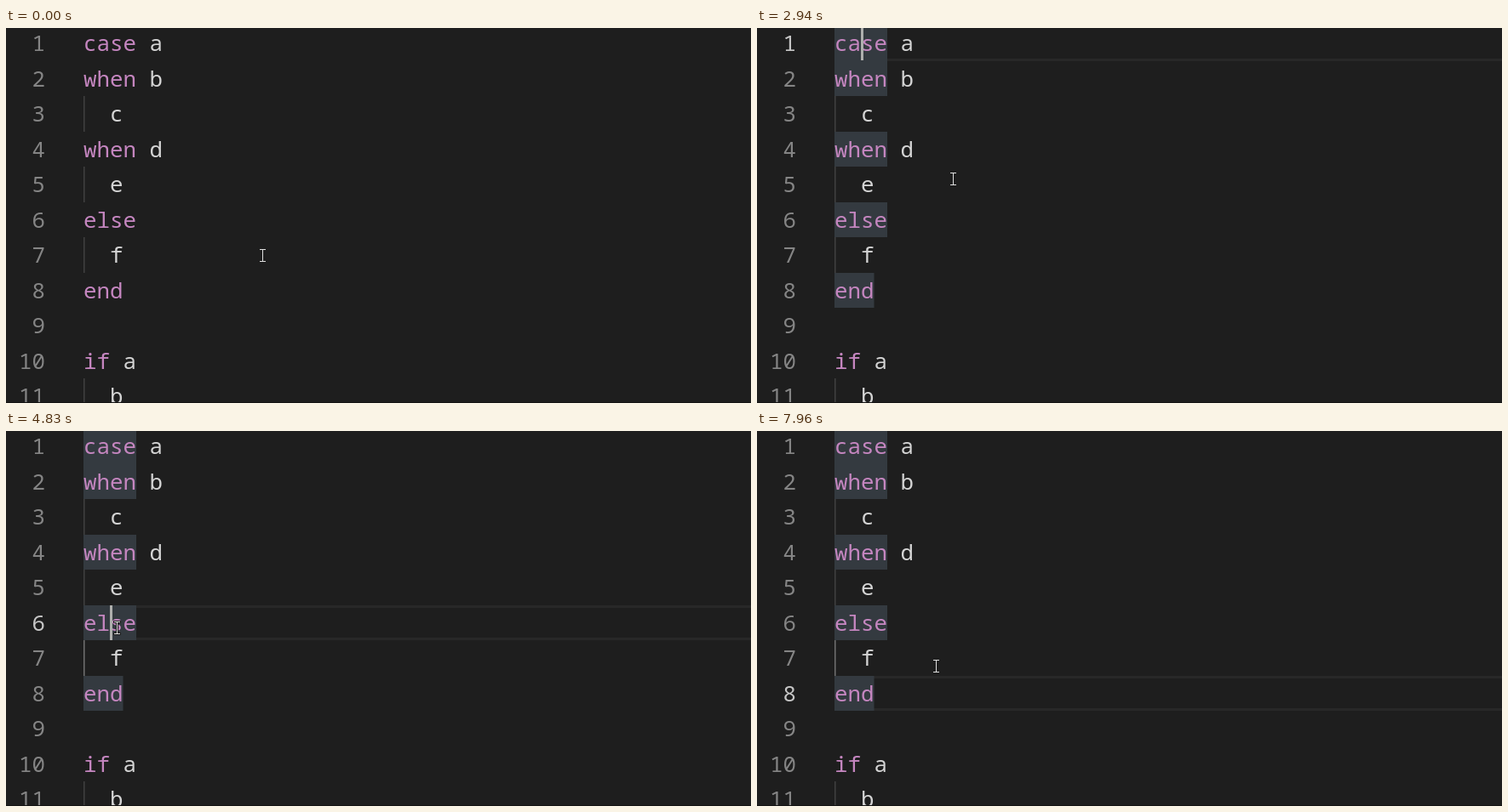
Animation of 875x441 px, one loop 8 s. Source, as an HTML page with a canvas:

```html
<!DOCTYPE html>
<html lang="en">
<head>
<meta charset="utf-8">
<title>Code editor</title>
<style>
html, body { margin: 0; width: 100%; height: 100%; overflow: hidden; background: #1e1e1e; }
canvas { display: block; }
</style>
</head>
<body>
<canvas width="875" height="441"></canvas>
<script>
const ctx = document.querySelector('canvas').getContext('2d');
const LOOP = 8000, STEP = 137, BLINK = 520, LIGHT_DELAY = 270;
const ROW = 41.5, COL = 15.5, LEFT = 91;
const lines = ['case a', 'when b', '  c', 'when d', '  e', 'else', '  f', 'end', '', 'if a', '  b'];
const keyword = /^(case|when|else|end|if)/;

// Pointer moves, each in a few visible steps
const moves = [
  { at: 650, steps: 8, x: 126, y: 21 },
  { at: 2280, steps: 4, x: 242, y: 168 },
  { at: 2820, steps: 3, x: 218, y: 186 },
  { at: 3740, steps: 5, x: 130, y: 231 },
  { at: 5100, steps: 5, x: 199, y: 267 },
  { at: 6320, steps: 6, x: 122, y: 307 },
  { at: 7690, steps: 3, x: 210, y: 276 }
];

const clicks = [
  { at: 1760, line: 1 }, { at: 3340, line: 5 }, { at: 4550, line: 6 },
  { at: 5920, line: 7 }, { at: 7130, line: 8 }
];

const rowTop = n => Math.round(-3 + ROW * (n - 1));
const easeOut = p => 1 - (1 - p) ** 1.65;

function pointerAt(t) {
  let x = 301, y = 267;
  for (const move of moves) {
    if (t < move.at) break;
    const done = Math.floor((t - move.at + 15) / STEP) + 1;
    const p = easeOut(Math.min(1, done / move.steps));
    x += (move.x - x) * p;
    y += (move.y - y) * p;
  }
  return [Math.round(x), Math.round(y)];
}

function box(x, y, w, h, color) {
  ctx.fillStyle = color;
  ctx.fillRect(x, y, w, h);
}

function write(text, x, n, color) {
  ctx.fillStyle = color;
  ctx.fillText(text, x, rowTop(n) + 30);
}

function drawPointer(x, y) {
  for (const [grow, color] of [[1, '#1e1e1e'], [0, '#e0e0e0']]) {
    for (const [dx, dy, w, h] of [[-3, -7, 7, 1], [0, -7, 1, 15], [-3, 7, 7, 1]])
      box(x + dx - grow, y + dy - grow, w + 2 * grow, h + 2 * grow, color);
  }
}

function draw(t) {
  const click = clicks.filter(c => c.at <= t).pop();
  const active = click ? click.line : 0;
  const onKeyword = click && keyword.test(lines[active - 1]);
  const lit = onKeyword && t >= click.at + LIGHT_DELAY;
  const guide = active >= 6 ? 7 : active;

  box(0, 0, 875, 441, '#1e1e1e');
  if (active) {
    box(LEFT, rowTop(active), 784, 3, '#282828');
    box(LEFT, rowTop(active + 1) - 3, 784, 3, '#282828');
  }

  ctx.font = `${COL / 0.6}px "Noto Sans Mono", "DejaVu Sans Mono", monospace`;
  lines.forEach((text, i) => {
    const n = i + 1, y = rowTop(n), h = rowTop(n + 1) - y;
    const word = (text.match(keyword) || [''])[0];
    if (lit && word && n <= 8) box(LEFT, y, word.length * COL, h, '#343a40');
    if (text[0] === ' ') box(LEFT, y, 1.5, h, n === guide ? '#707070' : '#404040');
    write(String(n).padStart(2), 15, n, n === active ? '#c6c6c6' : '#858585');
    write(word, LEFT, n, '#c586c0');
    write(text.slice(word.length), LEFT + word.length * COL, n, '#d4d4d4');
  });

  if (click && Math.floor((t - click.at) / BLINK) % 2 === 0)
    box(LEFT + (onKeyword ? 2 : 3) * COL, rowTop(active), 3, 41, '#aeafad');

  box(0, 440, 875, 1, '#141414');
  drawPointer(...pointerAt(t));
}

function tick() {
  draw(performance.now() % LOOP);
  requestAnimationFrame(tick);
}
tick();
</script>
</body>
</html>
```
